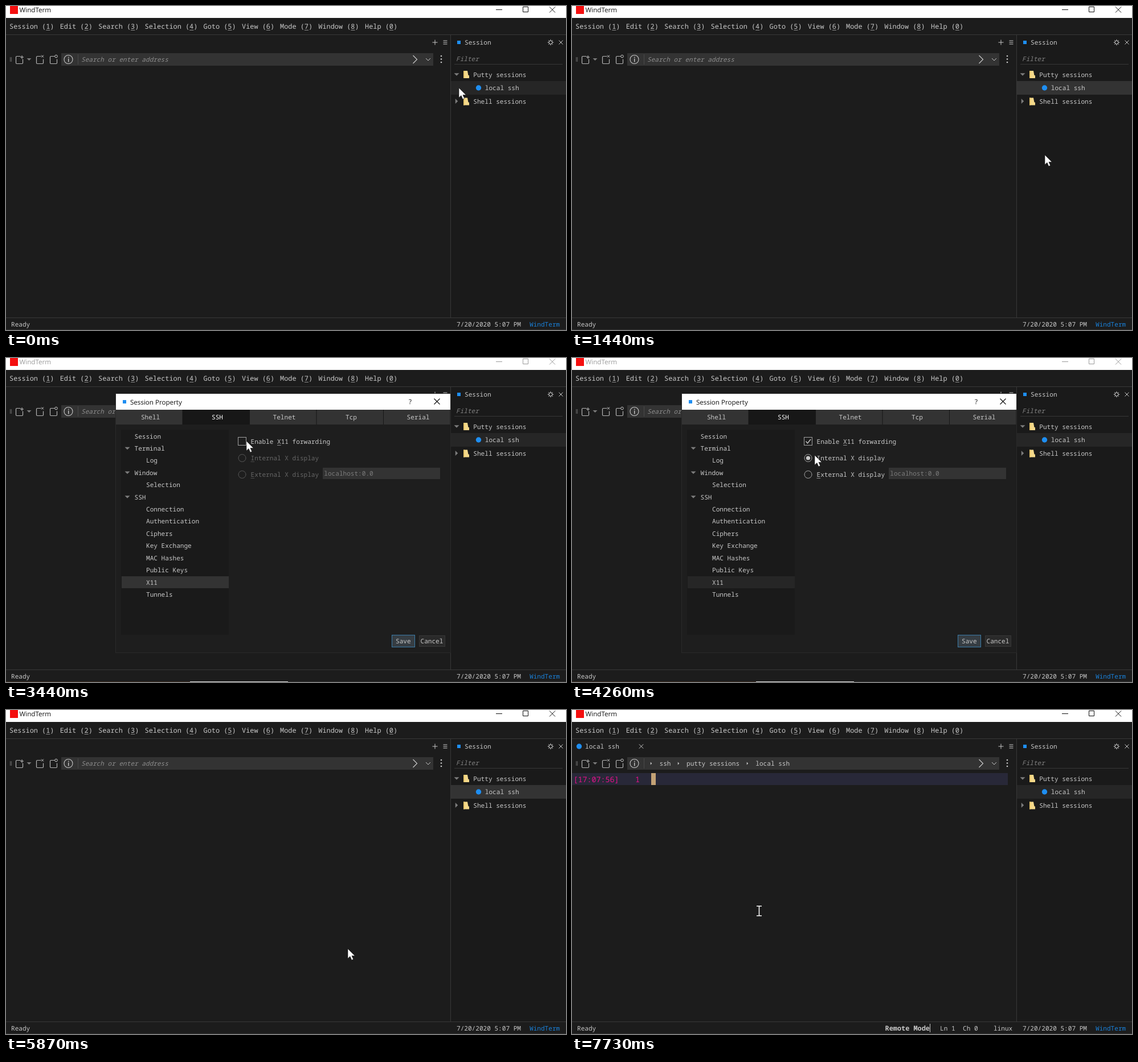
Write an HTML page that moves like this. It is 983 by 570 pixels and loops after 8000 ms.

```html
<!DOCTYPE html>
<html>
<head>
<meta charset="utf-8">
<style>
html, body { margin: 0; width: 100%; height: 100%; overflow: hidden; background: #1c1c1c; }
svg { display: block; }
text { font-family: "Noto Sans Mono", monospace; text-rendering: geometricPrecision; white-space: pre; }
text.ui { font-family: "Open Sans", sans-serif; }
</style>
</head>
<body>
<svg id="stage" width="983" height="570" viewBox="0 0 983 570"></svg>
<script>
const LOOP = 8000;
const SIZE = 11.08, BIG = 11.9, ADVANCE = 0.6;
const INK = '#c8c8c8', DIM = '#666', LINE = '#383838', BLUE = '#1e8ef2', GRAY = '#7c7c7c';

// Drawing helpers: each returns SVG markup
const rect = (x, y, w, h, fill, extra = '') =>
  `<rect x="${x}" y="${y}" width="${w}" height="${h}" fill="${fill}" ${extra}/>`;
const box = (x, y, w, h, fill, stroke) =>
  rect(x + .5, y + .5, w - 1, h - 1, fill, `stroke="${stroke}"`);
const text = (s, x, y, fill = INK, size = SIZE, extra = '') =>
  `<text x="${x}" y="${y}" fill="${fill}" font-size="${size}" ${extra}>${s}</text>`;
const ui = (s, x, y, fill) => text(s, x, y, fill, 11.6, 'class="ui"');
const path = (d, stroke = INK, width = 1, fill = 'none') =>
  `<path d="${d}" stroke="${stroke}" stroke-width="${width}" fill="${fill}"/>`;
const shape = (d, fill = GRAY) => `<path d="${d}" fill="${fill}"/>`;
const dot = (x, y, r, fill = BLUE, extra = '') =>
  `<circle cx="${x}" cy="${y}" r="${r}" fill="${fill}" ${extra}/>`;
const ring = (x, y, r, stroke, width = 1) =>
  dot(x, y, r, 'none', `stroke="${stroke}" stroke-width="${width}"`);
const down = (x, y, fill = GRAY, r = 4.5) => shape(`M${x - r} ${y - r / 2}h${2 * r}l${-r} ${r}z`, fill);
const up = (x, y, fill = GRAY, r = 4.5) => shape(`M${x - r} ${y + r / 2}h${2 * r}l${-r} ${-r}z`, fill);
const right = (x, y, r = 4.5, fill = GRAY) => shape(`M${x - r / 2} ${y - r}v${2 * r}l${r} ${-r}z`, fill);
const cross = (x, y, r, stroke = INK, width = 1) =>
  path(`M${x - r} ${y - r}l${2 * r} ${2 * r}m0 ${-2 * r}l${-2 * r} ${2 * r}`, stroke, width);
const group = (id, ...parts) => `<g id="${id}">${parts.join('')}</g>`;

// Text with one underlined shortcut letter
const hotkey = (s, x, y, i, fill = INK, size = SIZE) => {
  const w = size * ADVANCE;
  return text(s, x, y, fill, size) + rect(x + i * w, Math.floor(y) + 2, w, 1, fill, 'opacity=".65"');
};

function titleBar() {
  return rect(0, 0, 983, 21, '#fff') + rect(7, 0, 14, 14, '#f40f0f') +
    `<g id="titleInk" fill="#111" stroke="#111">` +
    `<text class="ui" x="23.5" y="11" font-size="11.6" stroke="none">WindTerm</text>` +
    `<path d="M860 6.5h11M907.5 1.5h9v9h-9zM954 1.5l10 10m0-10l-10 10" fill="none"/></g>`;
}

function menuBar() {
  const items = [['Session (1)', 6], ['Edit (2)', 94.7], ['Search (3)', 162], ['Selection (4)', 243.6],
    ['Goto (5)', 346.5], ['View (6)', 414], ['Mode (7)', 481], ['Window (8)', 548.3], ['Help (0)', 630]];
  return items.map(([s, x]) => hotkey(s, x, 40, s.length - 2, INK, BIG)).join('') +
    rect(0, 50, 983, 1, LINE);
}

function toolbar() {
  const page = x => path(`M${x + 8} 88.5h-6.5q-1.5 0-1.5 1.5v10q0 1.5 1.5 1.5h9q1.5 0 1.5-1.5v-6.5`, '#b5b5b5', 1.2);
  return path('M753 59.5v9M748.5 64h9M767.5 61h7m-7 3h7m-7 3h7') +
    rect(7, 90, 1, 8, '#666') + rect(9, 90, 1, 8, '#666') +
    page(17.5) + path('M28 87v6m-3-3h6') + down(40.5, 94, GRAY, 4) +
    page(53.5) + cross(64, 88.5, 2) +
    page(77.5) + ring(88, 88.5, 2.3, INK) +
    rect(97, 83, 653, 22, '#333') +
    ring(109.5, 94, 7.5, INK, 1.1) + rect(109, 92.5, 1.4, 6, INK) + rect(109, 89.5, 1.4, 1.6, INK) +
    rect(126, 85, 1, 18, '#4a4a4a') +
    path('M714.5 87l7 7-7 7', INK, 1.2) + path('M737 92l4 4 4-4') +
    [88, 93.5, 99].map(y => dot(764, y, 1.3, INK)).join('');
}

function sidePanel() {
  const folder = y => shape(`M803 ${y - 6}h7l1.5 8h1.5v5h-10z`, '#f4d98b') + rect(803, y - 6, 2, 13, '#e5c368');
  let rays = '';
  for (let i = 0; i < 8; i++) {
    const c = Math.cos(i * Math.PI / 4), s = Math.sin(i * Math.PI / 4);
    rays += `M${956 + 3 * c} ${64 + 3 * s}l${2.3 * c} ${2.3 * s}`;
  }
  return rect(781, 51, 202, 497, '#1a1a1a') + rect(780, 51, 1, 497, LINE) +
    rect(792, 61, 6, 6, BLUE) + text('Session', 805, 68) +
    ring(956, 64, 3, INK) + path(rays) + cross(974, 64, 3.5) +
    text('Filter', 790, 96.5, '#808080', SIZE, 'font-style="italic"') + rect(787, 102, 190, 1, LINE) +
    `<rect id="row" x="781" y="132" width="202" height="24"/>` +
    down(791, 120.5) + folder(120) + text('Putty sessions', 820.3, 124.5) +
    dot(829.5, 144, 4.7) + text('local ssh', 840.8, 148) +
    right(791, 167.5) + folder(167.5) + text('Shell sessions', 820.3, 171.5);
}

function statusBar() {
  return rect(0, 548, 983, 1, LINE) + rect(0, 569, 983, 1, '#303030') +
    text('Ready', 9, 564) + text('7/20/2020 5:07 PM', 791, 563.5) + text('WindTerm', 919, 563.5, '#1a82dc');
}

function connected() {
  return dot(12.5, 64, 4.7) + text('local ssh', 23, 68) + cross(121.5, 64, 3.7) +
    [[139, 'ssh', 153.5], [187, 'putty sessions', 201], [308, 'local ssh', 322.3]]
      .map(([x, s, tx]) => right(x, 94, 2.5, INK) + text(s, tx, 98)).join('') +
    rect(0, 111, 765, 21, '#282838') + text('[17:07:56]', 2.5, 126.5, '#e8118c', 13.35) +
    text('1', 111, 126.5, '#e8118c', 13.35) + rect(139, 111, 8, 21, '#c3a275') +
    text('Remote Mode', 549.5, 564, INK, BIG, 'font-weight="bold"') + rect(628, 552, 1, 15, INK) +
    text('Ln 1', 646, 564) + text('Ch 0', 686, 564) + text('linux', 740, 564);
}

function sessionPage() {
  const fields = [['Host', '10.0.1.27', 146], ['Port', '22', 172], ['Label', 'local ssh', 198.5],
    ['Group', 'Putty sessions', 225], ['Term', 'xterm-256color', 251], ['System', 'linux', 276.5],
    ['Charset', 'UTF-8', 302]];
  return fields.map(([label, value, y], i) => {
    const x = 453.5 - (label.length + 1) * SIZE * ADVANCE;
    const typed = i != 1 && i < 4;
    return hotkey(label + ':', x, y + 4, 0) +
      box(460, Math.floor(y) - (typed ? 11 : 10), 302, typed ? 21 : 20, '#1c1c1c', i ? '#343434' : '#23587f') +
      text(value, typed ? 463 : 461.8, y + 4) + (i > 3 ? down(754, y, DIM) : '');
  }).join('') + up(754, 167.5, DIM) + down(754, 177, DIM) + rect(733, 191, 1, 15, '#555') + dot(749, 198.5, 4.7);
}

function x11Page() {
  const option = (s, y) => `<g class="option">${hotkey(s, 429.5, y, 0, 'currentColor')}</g>`;
  return box(407, 139, 15, 15, 'none', '#a0a0a0') + hotkey('Enable X11 forwarding', 429.5, 151, 7) +
    option('Internal X display', 180) + option('External X display', 209) +
    `<g class="option" opacity=".8">${ring(414.5, 176, 6.5, 'currentColor')}${ring(414.5, 205, 6.5, 'currentColor')}</g>` +
    rect(556, 193, 206, 20, '#333') + text('localhost:0.0', 558.3, 207, '#7c7c7c') +
    group('checked', path('M410.5 146.5l3 3.5 5.5-7', INK, 1.4), dot(414.5, 176, 3.6, INK));
}

function dialog() {
  const tabs = ['Shell', 'SSH', 'Telnet', 'Tcp', 'Serial'].map((s, i) => {
    const x = 193 + i * 117.5, on = i == 1;
    return rect(x, 91, 116.5, 26, on ? '#171717' : '#333') +
      text(s, x + 60.5, 108, on ? '#fff' : INK, SIZE, 'text-anchor="middle"');
  }).join('');
  const tree = ['Session', '>Terminal', '  Log', '>Window', '  Selection', '>SSH', '  Connection',
    '  Authentication', '  Ciphers', '  Key Exchange', '  MAC Hashes', '  Public Keys', '  X11', '  Tunnels']
    .map((s, i) => {
      const y = 137.5 + i * 21.42;
      return (s[0] == '>' ? down(213, y) : '') +
        text(s.replace(/^[> ]+/, ''), s[0] == ' ' ? 246 : 225.5, y + 4);
    }).join('');
  return rect(0, 569, 323, 1, '#3a2a20') + rect(323, 569, 172, 1, '#e8e8e8') +
    rect(192, 62, 589, 457, '#2a2a2a') + rect(193, 63, 587, 455, '#1e1e1e') +
    rect(193, 63, 587, 28, '#fff') + rect(205, 74, 6, 6, BLUE) + ui('Session Property', 218, 81.5, '#111') +
    ui('?', 707, 81, '#111') + cross(756.5, 76.5, 5, '#111', 1.2) +
    rect(193, 91, 587, 26, '#171717') + tabs +
    rect(202, 126, 189, 361, '#1a1a1a') + `<rect id="pick" x="203" width="188" height="21"/>` + tree +
    box(677, 487, 41, 22, '#363d43', '#3a7ba8') + text('Save', 684, 501.5) +
    box(725, 488, 46, 20, '#2a2a2a', '#383838') + text('Cancel', 727.5, 501.5) +
    group('sessionPage', sessionPage()) + group('x11Page', x11Page());
}

const BEAM = 'M-4.5-8.5h9m-9 17h9M0-8.5v17';
stage.innerHTML = rect(0, 0, 983, 570, '#1c1c1c') + titleBar() + menuBar() + toolbar() + sidePanel() + statusBar() +
  group('placeholder', text('Search or enter address', 132, 98, '#8c8c8c', SIZE, 'font-style="italic"')) +
  group('connected', connected()) + group('dialog', dialog()) +
  group('arrow', path('M0 0v17.2l4-3.7 2.8 6.4 2.9-1.3-2.7-6.1h5.5z', '#111', .6, '#fff')) +
  group('beam', path(BEAM, '#111', 3), path(BEAM, '#fff', 1.6));

// Pointer stops: time, x, y; the pointer jumps from one to the next
const STOPS = [
  [0, 795, 144], [880, 808, 205], [1000, 826, 256], [1280, 830, 262],
  [1680, 745, 288], [1850, 560, 335], [2030, 400, 375], [2210, 300, 394], [2430, 266, 399],
  [3020, 350, 300], [3230, 470, 190], [3440, 422, 146], [4100, 424, 158], [4260, 426, 171],
  [4680, 480, 240], [4860, 590, 375], [5050, 670, 470], [5250, 692.5, 494.5],
  [5870, 600, 420], [6070, 458, 330], [6270, 640, 210], [6470, 833, 148],
  [6740, 838, 147], [6900, 843, 145], [7090, 845.5, 144], [7500, 560, 270], [7730, 328.5, 353.5]];

const $ = id => document.getElementById(id);
const show = (id, on) => $(id).setAttribute('display', on ? 'inline' : 'none');
const paint = (id, on) => $(id).setAttribute('fill', on ? '#333' : '#262626');

function draw(now) {
  const t = now % LOOP;
  const open = t >= 1680 && t < 5480, x11 = t >= 2650, checked = t >= 3830, live = t >= 7300;
  show('dialog', open);
  show('sessionPage', !x11);
  show('x11Page', x11);
  show('checked', checked);
  show('placeholder', !live);
  show('connected', live);
  paint('row', !open && !live && t >= 1280);
  paint('pick', x11 && !checked);
  $('pick').setAttribute('y', x11 ? 384 : 127);
  for (const el of document.querySelectorAll('.option')) el.style.color = checked ? INK : DIM;
  const ink = open ? '#9a9a9a' : '#111';
  $('titleInk').setAttribute('fill', ink);
  $('titleInk').setAttribute('stroke', ink);

  const [, x, y] = STOPS.findLast(s => s[0] <= t);
  const typing = t >= 7500;
  show('arrow', !typing);
  show('beam', typing);
  $(typing ? 'beam' : 'arrow').setAttribute('transform', `translate(${x} ${y})`);
}

const start = performance.now();
function tick() {
  draw(performance.now() - start);
  requestAnimationFrame(tick);
}
tick();
</script>
</body>
</html>
```
